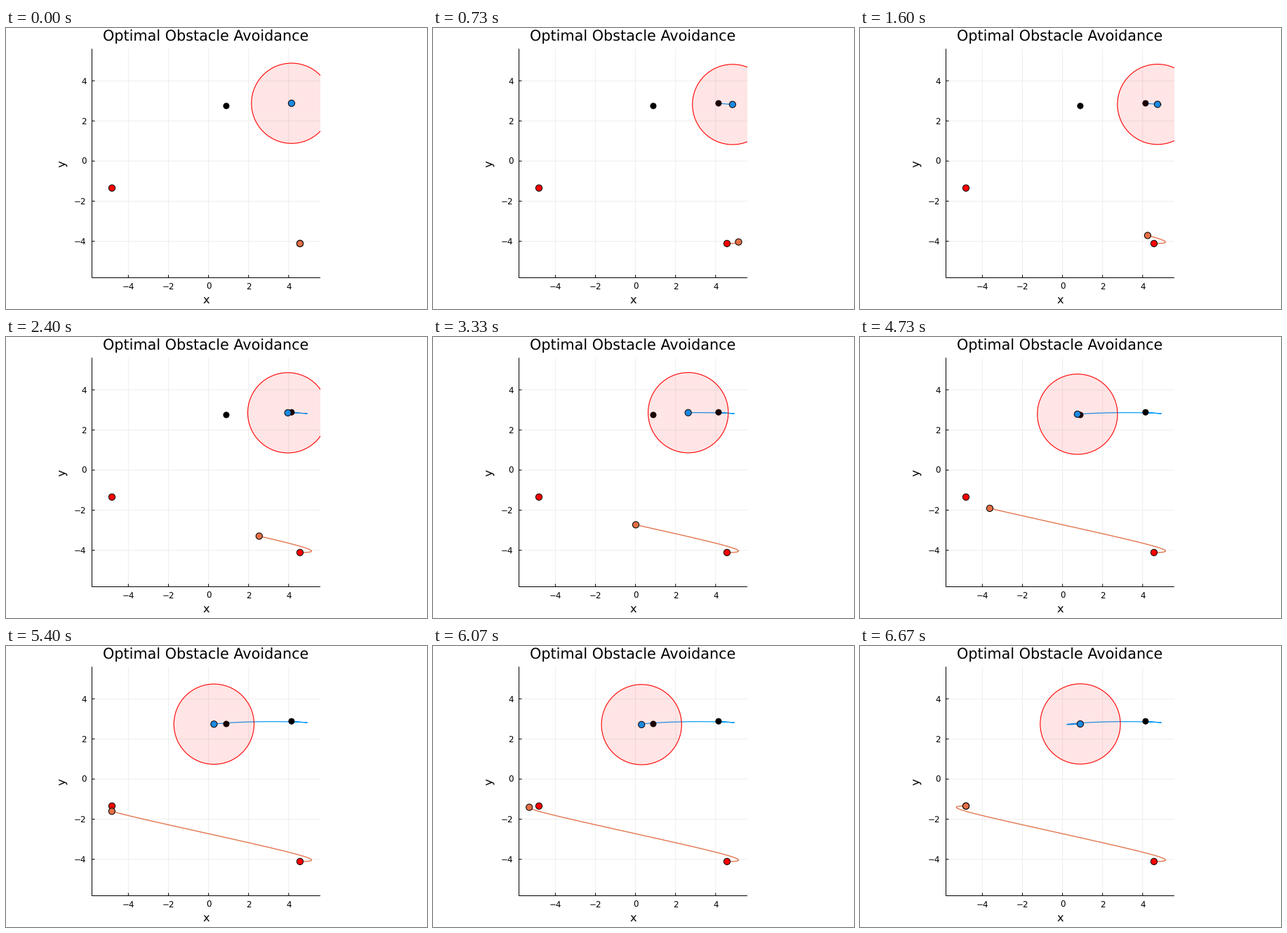
Recreate the animation shown at these times as a matplotlib script. Size 600x400 px, loop 6740 ms.

```python
import numpy as np
import matplotlib.pyplot as plt
from matplotlib.animation import FuncAnimation
from matplotlib.patches import Circle, Rectangle

W, H, DPI = 600, 400, 100
FRAMES, INTERVAL = 101, 66.6        # one loop of about 6.73 s
PT = 72 / DPI                       # points per pixel
X0, Y0, UNIT = 288.6, 189.4, 28.56  # data origin on the stage, pixels per unit
LEFT, RIGHT, TOP, BOTTOM = 122.5, 447.5, 30, 355.5
BLUE, ORANGE = "#009AFA", "#E26F46"

plt.rcParams.update({"font.family": "DejaVu Sans", "text.hinting": "none"})
fig = plt.figure(figsize=(W / DPI, H / DPI), dpi=DPI, facecolor="white")
ax = fig.add_axes([0, 0, 1, 1])
ax.set_xlim(0, W)
ax.set_ylim(H, 0)
ax.axis("off")


def line(xs, ys, color="black", width=1.0, z=2):
    return ax.plot(xs, ys, color=color, lw=width * PT, zorder=z, snap=False)[0]


def disc(pos, radius, fill, edge="black", width=1.0, z=4):
    return ax.add_patch(Circle(pos, radius, fc=fill, ec=edge, lw=width * PT,
                               zorder=z, snap=False))


def label(x, y, text, size, **kw):
    ax.text(x, y, text, fontsize=size * PT, va="baseline", **kw)


# Each coordinate is a polynomial in time, counted back from the middle
s = np.linspace(0.5, -0.5, FRAMES)
blue = np.column_stack([np.polyval([-780, -13, 288, 363.7], s),
                        np.polyval([-123, 0, 36, -3.8, 107.75], s)])
orange = np.column_stack([np.polyval([-640, 0, -900, -16, 533, 289], s),
                          np.polyval([-158, 0, 118.5, 267.3], s)])

# Grid, ticks and axes
for v in range(-4, 5, 2):
    gx, gy = X0 + UNIT * v, Y0 - UNIT * v
    name = str(v).replace("-", "\u2212")
    line([gx, gx], [TOP, BOTTOM], "#EEEEEE", z=0)
    line([LEFT, RIGHT], [gy, gy], "#EEEEEE", z=0)
    line([gx, gx], [BOTTOM, BOTTOM - 3.5])
    line([LEFT, LEFT + 3.5], [gy, gy])
    label(gx, 371.5, name, 11.9, ha="center")
    label(114.5, gy + 4.5, name, 11.9, ha="right")
line([LEFT, LEFT, RIGHT], [TOP, BOTTOM, BOTTOM])

label(285, 18.8, "Optimal Obstacle Avoidance", 20.8, ha="center")
label(285, 391.5, "x", 16.3, ha="center")
label(85.5, 193, "y", 16.3, ha="center", rotation=90, rotation_mode="anchor")

# Trails, end points, agents and the safety zone on top
trails = [line([], [], BLUE, 1.2, 3), line([], [], ORANGE, 1.3, 3)]
for i in (0, -1):
    disc(blue[i], 4.1, "black", width=0.8)
    disc(orange[i], 4.6, "red")
agents = [disc((0, 0), 4.6, c, z=5) for c in (BLUE, ORANGE)]
zone = disc((0, 0), 2 * UNIT, (1, 0, 0, 0.1), "red", 1.1, 6)
zone.set_clip_path(Rectangle((LEFT, TOP), RIGHT - LEFT, BOTTOM - TOP,
                             transform=ax.transData))


def draw(k):
    for path, trail, agent in zip((blue, orange), trails, agents):
        trail.set_data(*path[:k + 1].T)
        agent.center = path[k]
    zone.center = blue[k]
    return *trails, *agents, zone


anim = FuncAnimation(fig, draw, frames=FRAMES, init_func=lambda: draw(0),
                     interval=INTERVAL, repeat=True, repeat_delay=0)
plt.show()
```
